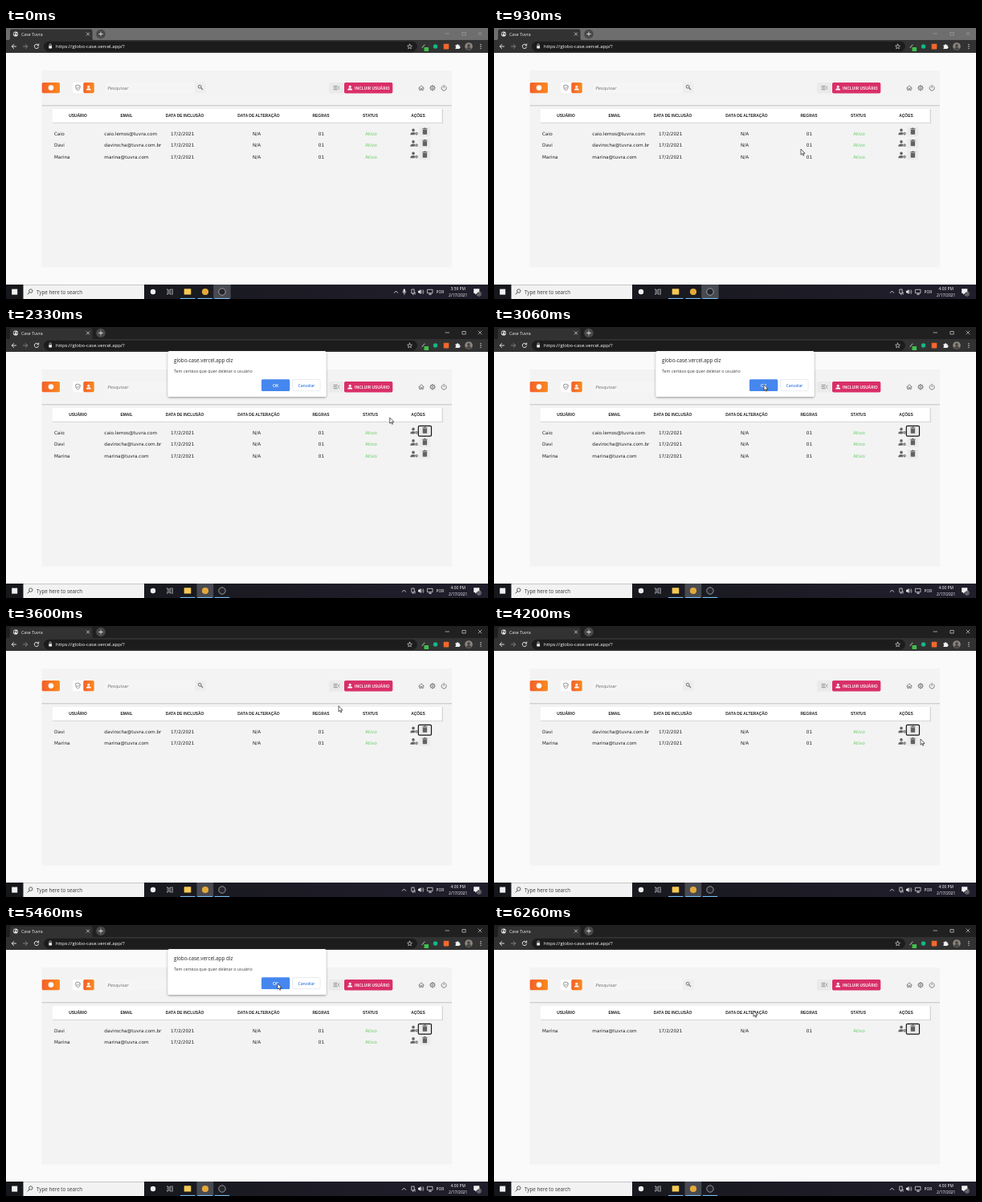
Write an HTML page that moves like this. It is 600 px wide and 338 px high and loops after 6330 ms.

```html
<!DOCTYPE html>
<html lang="pt-BR">
<head>
<meta charset="utf-8">
<title>Case Tuvra</title>
<style>
  html, body { margin: 0; width: 100%; height: 100%; overflow: hidden; background: #fafafa; }
  svg { display: block; width: 100vw; height: 100vh; }
  text { font-family: "Open Sans", sans-serif; white-space: pre; }
  .head { font: bold 4.9px "Liberation Sans", Arial, sans-serif; fill: #222; }
  .cell { font: 5.75px "DejaVu Sans", Verdana, sans-serif; fill: #222; }
  .hint { font: italic 5.4px "DejaVu Sans", Verdana, sans-serif; fill: #777; }
  .action { font: 500 5.2px Roboto, sans-serif; fill: #fff; letter-spacing: 0.1px; }
  .active { fill: #68cf68; }
  .line { fill: none; stroke-linecap: round; stroke-linejoin: round; }
</style>
</head>
<body>
<svg id="stage" viewBox="0 0 600 338" xmlns="http://www.w3.org/2000/svg"></svg>
<script>
const LOOP = 6330, FRAMES = 95;

const attrs = o => Object.entries(o).map(([k, v]) => ` ${k}="${v}"`).join('');
const rect = (x, y, w, h, fill, more = {}) =>
  `<rect${attrs({ x, y, width: w, height: h, fill, ...more })}/>`;
const dot = (cx, cy, r, fill, more = {}) => `<circle${attrs({ cx, cy, r, fill, ...more })}/>`;
const fillPath = (d, fill, more = {}) => `<path${attrs({ d, fill, ...more })}/>`;
const line = (d, stroke, width = 0.8) =>
  `<path${attrs({ class: 'line', d, stroke, 'stroke-width': width })}/>`;
const label = (x, y, str, more = {}) => `<text${attrs({ x, y, ...more })}>${str}</text>`;
const group = (more, ...parts) => `<g${attrs(more)}>${parts.join('')}</g>`;
const at = (x, y, ...parts) => group({ transform: `translate(${x} ${y})` }, ...parts);
const mid = { 'text-anchor': 'middle' };

const person = color =>
  dot(0, -1.4, 1.5, color) + fillPath('M-2.8 2.8V1.9Q-2.5.6 0 .6T2.8 1.9V2.8Z', color);

function gear(r, color, width) {
  const teeth = [...Array(8)].map((_, i) => {
    const a = i * Math.PI / 4, c = Math.cos(a), s = Math.sin(a);
    return `M${c * r} ${s * r}L${c * r * 1.3} ${s * r * 1.3}`;
  }).join('');
  return dot(0, 0, r, 'none', { stroke: color, 'stroke-width': width }) + line(teeth, color, width);
}

function browser() {
  const white = '#f1f1f1', bar = '#323232';
  return [
    rect(0, 0, 600, 15.5, '#202020', { id: 'frame' }),
    fillPath('M2 15.5Q5 15.5 5 12.5V4Q5 1.5 7.5 1.5H105Q107.5 1.5 107.5 4V12.5Q107.5 15.5 110.5 15.5Z', bar),
    rect(0, 15, 600, 16, bar),
    at(12, 7.5, dot(0, 0, 3.1, white),
      fillPath('M-2.5-1.2L-.6-2.3L.2-.7L-1.1.4L-.4 2.2L-2.4.7ZM1.1-1.8L2.4-.8V1L1 1.3L.6.2Z', '#4a4a4a')),
    label(19, 9.6, 'Case Tuvra', { 'font-size': 5.3, fill: white }),
    line('M100.3 5.8L103.7 9.2M103.7 5.8L100.3 9.2', white, 0.7),
    dot(118, 7.5, 5.8, '#484848'),
    line('M115.6 7.5H120.4M118 5.1V9.9', white, 0.8),
    group({ id: 'controls' }, line('M547 7H551.5', white, 0.6),
      line('M568.3 5.5H572.2V9H568.3Z', white, 0.6),
      line('M588 5L592 9M592 5L588 9', white, 0.6)),
    line('M12.5 23H7.3M9.7 20.5L7.2 23L9.7 25.5', white, 0.9),
    line('M21.5 23H26.7M24.3 20.5L26.8 23L24.3 25.5', '#8a8a8a', 0.9),
    line('M40.3 21.4A2.7 2.7 0 1 0 40.6 23.8M40.7 19.9V21.8H38.8', white, 0.9),
    rect(47, 16.8, 465, 12.6, '#1c1c1c', { rx: 6.3 }),
    rect(53.3, 22.2, 3.8, 3.2, white, { rx: 0.4 }),
    line('M54.1 22V20.9A1.1 1.1 0 0 1 56.3 20.9V22', white, 0.6),
    label(62, 25.2, 'https://globo-case.vercel.app/?', { 'font-size': 6, fill: '#fff' }),
    line('M502.5 20.1L503.3 22.1L505.4 22.3L503.8 23.7L504.3 25.8L502.5 24.7L500.7 25.8L501.2 23.7L499.6 22.3L501.7 22.1Z', white, 0.6),
    line('M518 24.5L521 21', '#9fb3a4', 1.1),
    rect(520.5, 24, 5.6, 5, '#3fbf4c', { rx: 0.6 }),
    dot(534.5, 23, 2.7, '#12b886'),
    rect(544.7, 19.8, 6.6, 6.6, '#f2672a', { rx: 0.8 }),
    fillPath('M559.5 21.3H561A1.1 1.1 0 0 1 563.2 21.3H564.6V23A1.1 1.1 0 0 1 564.6 25.2V26H559.5V24.6A1 1 0 0 0 559.5 22.7Z', white),
    dot(576, 23, 4.8, '#8b867f'),
    fillPath('M572.4 26.1Q573.2 24 576 24T579.6 26.1A4.8 4.8 0 0 1 572.4 26.1Z', '#4a4542'),
    dot(576, 22, 1.9, '#4a4542'),
    ...[20.7, 23, 25.3].map(y => dot(591, y, 0.65, white)),
  ].join('');
}

function page() {
  const grey = '#666';
  const titles = [[89.5, 'USUÁRIO'], [150, 'EMAIL'], [222.5, 'DATA DE INCLUSÃO'],
    [314.5, 'DATA DE ALTERAÇÃO'], [392, 'REGRAS'], [453.5, 'STATUS'], [513, 'AÇÕES']];
  return [
    rect(0, 31, 600, 289, '#fafafa'),
    rect(44.5, 53, 510.5, 245.5, '#f3f3f3'),
    rect(44.5, 96, 510.5, 1, '#d0d0d0'),
    rect(44.5, 97, 510.5, 1, '#e4e4e4'),
    rect(44.7, 68, 22.3, 13.2, 'url(#orange)', { rx: 1.8 }),
    dot(56, 74.6, 3.3, '#fff'),
    rect(83, 68, 16, 13.2, '#fff', { rx: 2 }),
    line('M89.5 71.2L92.2 72.2V74.3Q92 76.8 89.5 78Q87 76.8 86.8 74.3V72.2ZM88.2 74.6L89.2 75.6L91 73.6', grey, 0.7),
    rect(96.3, 68, 13.4, 13.2, 'url(#orange)', { rx: 1.8 }),
    at(102.8, 74.6, person('#fff')),
    rect(123, 68, 126, 13.2, '#f5f5f5', { rx: 1.5 }),
    label(126.5, 76.6, 'Pesquisar', { class: 'hint' }),
    rect(235, 68, 14, 13.2, '#eee', { rx: 1.5 }),
    dot(241.2, 73.2, 1.9, 'none', { stroke: grey, 'stroke-width': 0.9 }),
    line('M242.7 74.7L244.7 76.7', grey, 1.1),
    rect(402, 68, 18, 13.5, '#eaeaea', { rx: 1.5 }),
    line('M408 72.5H412.3M408 74.6H411.6M408 76.7H412.3M415 73L413.3 74.6L415 76.2', grey, 0.7),
    rect(421, 68, 60.3, 13.5, '#d92f68', { rx: 1.8 }),
    at(428.2, 74.7, person('#fff')),
    label(434, 76.6, 'INCLUIR USUÁRIO', { class: 'action' }),
    line('M513.7 75L517 71.8L520.3 75M514.8 74.3V77.6H516.2V75.6H517.8V77.6H519.2V74.3', grey, 0.8),
    at(531, 74.8, gear(2.5, grey, 0.9), dot(0, 0, 0.9, grey)),
    line('M543.2 72.5A3.1 3.1 0 1 0 547 72.5M545.1 71.2V74.7', grey, 0.8),
    rect(58, 101.3, 486, 17.8, '#d4d4d4', { rx: 0.8 }),
    rect(57.3, 100.5, 485.5, 17.5, '#fff', { rx: 0.8, stroke: '#e4e4e4', 'stroke-width': 0.4 }),
    ...titles.map(([x, s]) => label(x, 111.4, s, { class: 'head', ...mid })),
  ].join('');
}

function userRow(name, email) {
  const dark = '#626262';
  return [
    label(60, 133.8, name, { class: 'cell' }),
    label(122.3, 133.8, email, { class: 'cell' }),
    label(219.7, 133.8, '17/2/2021', { class: 'cell', ...mid }),
    label(312, 133.8, 'N/A', { class: 'cell', ...mid }),
    label(392.5, 133.8, '01', { class: 'cell', ...mid }),
    group({ class: 'active' }, label(454.5, 133.8, 'Ativo', { class: 'cell', style: 'fill:inherit', ...mid })),
    dot(507, 127.4, 1.8, dark),
    fillPath('M503.4 133.2V132.1Q504 130.1 507 130.1L509 130.5L508.7 133.2Z', dark),
    at(511, 131.7, gear(1.2, dark, 0.7)),
    rect(514.2, 123.4, 14.3, 12, '#ebebeb', { rx: 1 }),
    fillPath('M518.3 125.2H520.1L520.6 124.6H522.2L522.7 125.2H524.5V126.2H518.3ZM518.7 126.8H524.1V131.9Q524.1 132.8 523.2 132.8H519.6Q518.7 132.8 518.7 131.9Z', dark),
  ].join('');
}

function dialog() {
  return [
    rect(201.5, 30, 197, 57, '#fff', { rx: 2, filter: 'url(#shadow)' }),
    label(209, 44.2, 'globo-case.vercel.app diz', { 'font-size': 6.3, fill: '#202124' }),
    label(209, 56.6, 'Tem certeza que quer deletar o usuário', { 'font-size': 5.33, fill: '#3c4043' }),
    rect(318, 65.3, 35.3, 14.7, '#4587ee', { rx: 1.5 }),
    label(335.6, 74.5, 'OK', { 'font-size': 5.1, 'font-weight': 600, fill: '#fff', ...mid }),
    rect(356.7, 65.6, 34.4, 14.1, '#fff', { rx: 1.5, stroke: '#dadce0', 'stroke-width': 0.6 }),
    label(374, 74.5, 'Cancelar', { 'font-size': 5, 'font-weight': 600, fill: '#3f7fe0', ...mid }),
  ].join('');
}

function taskbar() {
  const white = '#f0f0f0', ink = '#3a3a3a';
  const small = (x, y, s, more) => label(x, y, s, { 'font-size': 4.9, fill: '#fff', ...mid, ...more });
  return [
    rect(0, 320, 600, 18, 'url(#dusk)'),
    rect(7.2, 325.6, 7, 7, white),
    rect(21.5, 320.2, 150.5, 17.8, '#f2f2f2'),
    dot(30.8, 328, 2.2, 'none', { stroke: ink, 'stroke-width': 0.8 }),
    line('M29.2 329.7L27 332', ink, 0.9),
    label(38, 331.5, 'Type here to search', { 'font-size': 6.25, fill: ink }),
    dot(183, 329, 3.2, white),
    line('M200.8 325.7V327H205.2V325.7M200.8 332.3V331H205.2V332.3M200.8 329H205.2M207.2 325.7V332.3', white, 0.7),
    rect(237.5, 320, 20.7, 18, '#484a52', { id: 'browserActive' }),
    rect(258.2, 320, 21.5, 18, '#484a52', { id: 'recorderActive' }),
    ...[217, 238.5, 259.7].map(x => rect(x, 336.9, 18.5, 1.1, '#76b9ed')),
    rect(221.7, 325.3, 8.6, 7.2, '#f6c952', { rx: 0.5 }),
    dot(248, 329, 4.1, '#e5a93a'),
    dot(269, 329, 4.2, '#24262b', { stroke: '#c9c9c9', 'stroke-width': 0.7 }),
    group({ id: 'caret' }, line('M-2.2 1.3L0-1L2.2 1.3', white, 0.8)),
    group({ id: 'mic' }, rect(494.6, 325.5, 2.4, 4.2, white, { rx: 1.2 }),
      line('M493.6 328.8Q493.8 330.8 495.8 330.8T498 328.8M495.8 330.8V332.6', white, 0.6)),
    line('M505.2 326H508.2V331H505.2ZM506.7 331V332.7M509 329.5V332.3', white, 0.7),
    fillPath('M513 327.8H514.4L516.4 326V332L514.4 330.3H513Z', white),
    line('M517.7 327.6Q518.8 329 517.7 330.5M519.2 326.6Q521 329 519.2 331.5', white, 0.6),
    line('M524.8 326.3H531V330.6H524.8ZM526.5 332.3H529.5M528 330.8V332.2', white, 0.7),
    small(540.4, 331, 'POR'),
    small(562.7, 327.2, '4:00 PM', { id: 'clock' }),
    small(562.7, 335.3, '2/17/2021'),
    fillPath('M582.2 325.3H589.3V331H585.7L584 332.7V331H582.2Z', white),
    dot(588.8, 331.7, 2.6, '#3a3d42', { stroke: white, 'stroke-width': 0.4 }),
    small(588.8, 333, '2', { 'font-size': 3.6 }),
  ].join('');
}

const users = [['Caio', 'caio.lemos@tuvra.com'], ['Davi', 'davirocha@tuvra.com.br'],
  ['Marina', 'marina@tuvra.com']];

document.getElementById('stage').innerHTML = `<defs>
  <linearGradient id="orange"><stop stop-color="#f4602a"/><stop offset="1" stop-color="#fa8a1e"/></linearGradient>
  <linearGradient id="dusk"><stop stop-color="#15171a"/><stop offset="1" stop-color="#211e2c"/></linearGradient>
  <filter id="shadow" x="-10%" y="-20%" width="120%" height="150%">
    <feDropShadow dx="0" dy="1" stdDeviation="1.6" flood-color="#000" flood-opacity=".4"/></filter>
  </defs>` + [
  page(),
  ...users.map((u, i) => group({ id: 'user' + i }, userRow(...u))),
  rect(513.3, 123.4, 16.2, 12.8, 'none', { id: 'focus', rx: 1.4, stroke: '#161616', 'stroke-width': 1.2 }),
  browser(),
  group({ id: 'dialog' }, dialog()),
  taskbar(),
  group({ id: 'cursor' }, fillPath('M0 0V7.2L1.7 5.7L2.8 8.2L3.9 7.7L2.8 5.3H5.1Z', '#fff',
    { stroke: '#111', 'stroke-width': 0.65, 'stroke-linejoin': 'round' })),
].join('');

const el = id => document.getElementById(id);
const show = (id, on) => el(id).setAttribute('display', on ? 'inline' : 'none');
const move = (id, x, y) => el(id).setAttribute('transform', `translate(${x} ${y})`);

// time, x, y of the pointer
const pointer = [[350, 372, 342], [930, 382, 151], [1720, 519, 125], [2080, 519, 125],
  [2900, 336, 72], [3230, 336, 72], [4080, 531, 141], [4230, 531, 141], [4480, 522, 128],
  [4700, 522, 128], [5340, 338, 73], [5600, 338, 73], [6200, 323, 107], [LOOP, 323, 107]];

function pointerAt(t) {
  const i = pointer.findIndex(p => p[0] > t);
  if (i < 1) return pointer[0].slice(1);
  const [t0, x0, y0] = pointer[i - 1], [t1, x1, y1] = pointer[i];
  const u = (t - t0) / (t1 - t0), k = u * u * (3 - 2 * u);
  return [x0 + (x1 - x0) * k, y0 + (y1 - y0) * k];
}

function render(ms) {
  const step = LOOP / FRAMES;
  const t = Math.floor((ms % LOOP + 5) / step) % FRAMES * step;
  const focused = t >= 1920, starting = t < 500;
  const removed = t >= 5620 ? 2 : t >= 3250 ? 1 : 0;

  el('frame').setAttribute('fill', focused ? '#202020' : '#6e6e6e');
  el('controls').setAttribute('opacity', focused ? 1 : 0.45);
  show('browserActive', focused);
  show('recorderActive', !focused);
  show('focus', focused);
  show('dialog', (t >= 2050 && t < 3250) || (t >= 4650 && t < 5620));
  users.forEach((_, i) => {
    show('user' + i, i >= removed);
    move('user' + i, 0, (i - removed) * 14.5);
  });
  show('mic', starting);
  move('caret', starting ? 485.5 : 495.5, 329);
  el('clock').textContent = starting ? '3:59 PM' : '4:00 PM';
  show('cursor', t >= 350);
  move('cursor', ...pointerAt(t));
}

const start = performance.now();
function tick() {
  render(performance.now() - start);
  requestAnimationFrame(tick);
}
tick();
</script>
</body>
</html>
```
